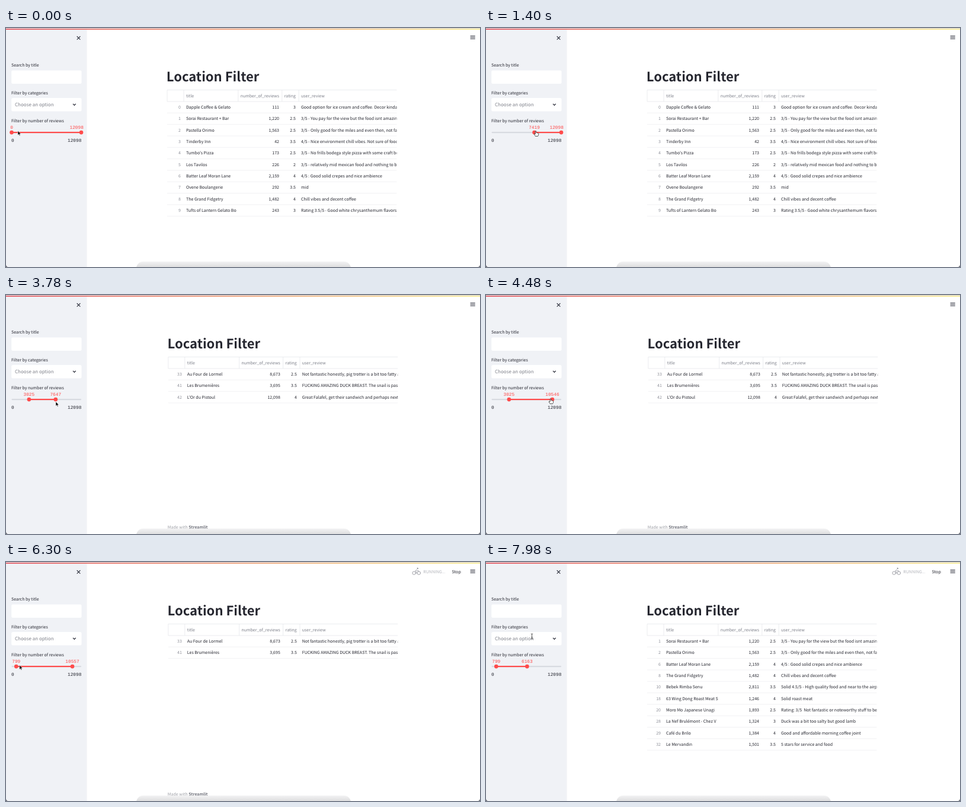
Write an HTML page that moves like this. It is 800 px wide and 403 px high and loops after 8000 ms.

```html
<!DOCTYPE html>
<html lang="en">
<head>
<meta charset="utf-8">
<title>Location Filter</title>
<style>
html, body { margin: 0; width: 100%; height: 100%; overflow: hidden; background: #fff; }
svg { display: block; width: 100vw; height: 100vh; }
text {
  font: 7.03px "Noto Sans CJK SC", "Noto Sans CJK JP", "Noto Sans CJK TC", "Noto Sans CJK KR", Lato, sans-serif;
  fill: #262730; white-space: pre; text-rendering: geometricPrecision;
}
.title { font-size: 22px; font-weight: 700; }
.hint { font-size: 8.02px; fill: #7f818a; }
.head { fill: #7c7f89; }
.index { fill: #8e9099; }
.foot { fill: #9b9da4; }
.num { font: 7.8px "Liberation Mono", monospace; }
.red { fill: #ff4b4b; }
.pale { fill: #b4b6bc; }
</style>
</head>
<body>
<svg id="stage" viewBox="0 0 800 403" preserveAspectRatio="none">
  <defs>
    <linearGradient id="bar"><stop offset="0" stop-color="#e5606b"/><stop offset=".5" stop-color="#efa680"/><stop offset="1" stop-color="#f8ee9c"/></linearGradient>
    <linearGradient id="dockFill" x2="0" y2="1"><stop offset="0" stop-color="#f3f3f4"/><stop offset="1" stop-color="#dededf"/></linearGradient>
    <clipPath id="nameClip"><rect x="300" y="100" width="91.7" height="230"/></clipPath>
    <clipPath id="tableClip"><rect x="270" y="100" width="389.5" height="230"/></clipPath>
  </defs>
  <rect width="800" height="403" fill="#fff"/>
  <g id="sidebar"><rect width="136.5" height="403" fill="#f0f2f6"/></g>
  <rect width="800" height="1" fill="#dcd8da"/>
  <rect y="1.2" width="800" height="1.8" fill="url(#bar)"/>
  <g id="page"></g>
  <g fill="none" stroke="#31333f">
    <path d="M119.7 14l5.7 5.7m0-5.7l-5.7 5.7" stroke-width="1.1"/>
    <path d="M783.6 13.4h8.2m-8.2 2.4h8.2m-8.2 2.4h8.2" stroke-width="1"/>
  </g>
  <g id="status">
    <g id="person" fill="none" stroke="#b3b5bb" stroke-width="1.5" stroke-linecap="round">
      <circle cx="692.5" cy="11.6" r=".9" fill="#b3b5bb" stroke-width=".6"/>
      <path d="M688.5 14.2l4 .5l4-.5M692.5 15v2.5l-1.5 4m1.5-4l1.5 4"/>
    </g>
    <g id="cyclist" fill="none" stroke="#93959c" stroke-width=".9" stroke-linecap="round" stroke-linejoin="round">
      <circle cx="688.7" cy="18.6" r="2.7"/><circle cx="696.9" cy="18.6" r="2.7"/>
      <circle cx="694.6" cy="10.8" r=".8" fill="#93959c"/>
      <path d="M696.7 15h-2.2l-1.7-1.9l-2.2 2l2.2 1.6v2.6"/>
    </g>
  </g>
  <path d="M220 403q3-9.3 12-9.3h338q9 0 12 9.3z" fill="url(#dockFill)"/>
  <path d="M0 399.5q.4 3 3 3.5H0zM800 399.5q-.4 3-3 3.5h3z" fill="#55565e"/>
  <g id="cursor" stroke-linejoin="round">
    <path id="arrow" d="M0 0V7.2L1.7 5.6L2.8 8.3L4 7.8L2.9 5.2H5.2Z" fill="#000" stroke="#fff" stroke-width=".5"/>
    <path id="hand" d="M-.8 .6Q0-.5.8.6V3.1Q1.7 2.6 2.3 3.4Q3.2 3 3.7 3.9Q4.8 3.8 4.8 5Q4.8 7.4 3.5 9H-.7Q-1.4 7.3-3 5.5Q-2.6 4.4-.8 5.6Z" fill="#fff" stroke="#222" stroke-width=".75"/>
    <path id="beam" d="M-1.6-4.3Q0-4.3 0-3.2Q0-4.3 1.6-4.3M0-3.2V3.7M-1.6 4.6Q0 4.6 0 3.5Q0 4.6 1.6 4.6M-1 1.6H1" fill="none" stroke="#333" stroke-width=".8"/>
  </g>
</svg>
<script>
const LOOP = 8000, STEP = 70, MAX = 12098;
const $ = id => document.getElementById(id);

function add(parent, tag, attrs, content) {
  const el = document.createElementNS('http://www.w3.org/2000/svg', tag);
  for (const k in attrs) el.setAttribute(k, attrs[k]);
  if (content !== undefined) el.textContent = content;
  parent.appendChild(el);
  return el;
}
const label = (parent, x, y, str, cls = '', anchor = 'start') =>
  add(parent, 'text', { x, y, class: cls, 'text-anchor': anchor }, str);

// Sidebar
const side = $('sidebar');
label(side, 9, 65.4, 'Search by title');
label(side, 9, 112, 'Filter by categories');
label(side, 9, 158.6, 'Filter by number of reviews');
for (const y of [71.5, 118]) add(side, 'rect', { x: 9.2, y, width: 118.3, height: 22.6, rx: 2.5, fill: '#fff' });
label(side, 15, 132.2, 'Choose an option', 'hint');
add(side, 'path', { d: 'M113 127.9l2.4 2.4l2.4-2.4', fill: 'none', stroke: '#31333f', 'stroke-width': 1.3 });
add(side, 'rect', { x: 9.5, y: 175, width: 117.5, height: 2.2, rx: 1, fill: '#d8dae0' });
const range = add(side, 'rect', { y: 175, height: 2.2, fill: '#ff4b4b' });
label(side, 9, 191.5, '0', 'num');
label(side, 127.4, 191.5, MAX, 'num', 'end');
const thumbs = [0, 1].map(() => ({
  dot: add(side, 'circle', { cy: 176.1, r: 3.35, fill: '#ff4b4b' }),
  text: label(side, 0, 169.8, '', 'num red', 'middle')
}));

// Main page
const opening = `0|Dapple Coffee & Gelato|111|3|Good option for ice cream and coffee. Decor kinda
1|Sorai Restaurant + Bar|1,220|2.5|3/5 - You pay for the view but the food isnt amazing
2|Pastella Orimo|1,563|2.5|3/5 - Only good for the miles and even then, not fan
3|Tinderby Inn|42|3.5|4/5 - Nice environment chill vibes. Not sure of food
4|Tumbo's Pizza|173|2.5|3/5 - No frills bodega style pizza with some craft beer
5|Los Tavilos|226|2|3/5 - relatively mid mexican food and nothing to be
6|Batter Leaf Moran Lane|2,159|4|4/5 : Good solid crepes and nice ambience
7|Ovene Boulangerie|292|3.5|mid
8|The Grand Fidgetry|1,482|4|Chill vibes and decent coffee
9|Tufts of Lantern Gelato Bo|243|3|Rating 3.5/5 - Good white chrysanthemum flavors`.split('\n');
const large = `33|Au Four de Lormel|8,673|2.5|Not fantastic honestly, pig trotter is a bit too fatty a
41|Les Brumenières|3,695|3.5|FUCKING AMAZING DUCK BREAST. The snail is pas
42|L'Or du Pistoul|12,098|4|Great Falafel, get their sandwich and perhaps next`.split('\n');
const middle = [opening[1], opening[2], opening[6], opening[8], ...`10|Bebek Rimba Senu|2,811|3.5|Solid 4.5/5 - High quality food and near to the airport
18|63 Wing Dong Roast Meat S|1,246|4|Solid roast meat
20|Moro Mo Japanese Unagi|1,893|2.5|Rating: 3/5  Not fantastic or noteworthy stuff to be
28|La Nef Brulémont - Chez V|1,324|3|Duck was a bit too salty but good lamb
29|Café du Brilo|1,384|4|Good and affordable morning coffee joint
32|Le Mervandin|1,501|3.5|5 stars for service and food`.split('\n')];

function buildView(rows, short) {
  const view = add($('page'), 'g', { transform: `translate(${short ? 1.8 : 0} 0)` });
  label(view, 270.8, 89.5, 'Location Filter', 'title');
  const table = add(view, 'g', { 'clip-path': 'url(#tableClip)' });
  add(table, 'path', {
    d: 'M272 104.5H660M272 124H660M272 104.5V124M300 104.5V124M391.8 104.5V124M465.8 104.5V124M494.2 104.5V124',
    fill: 'none', stroke: '#e6e7eb', 'stroke-width': .8
  });
  label(table, 304, 116.8, 'title', 'head');
  label(table, 461, 116.8, 'number_of_reviews', 'head', 'end');
  label(table, 489, 116.8, 'rating', 'head', 'end');
  label(table, 498, 116.8, 'user_review', 'head');
  const names = add(table, 'g', { 'clip-path': 'url(#nameClip)' });
  rows.forEach((row, i) => {
    const [index, name, count, rating, review] = row.split('|');
    const y = 136.1 + i * 19.33;
    label(table, 295, y, index, 'index', 'end');
    label(names, 304, y, name);
    label(table, 461, y, count, '', 'end');
    label(table, 489, y, rating, '', 'end');
    label(table, 498, y, review);
    add(table, 'path', { d: `M272 ${y + 7.2}H660`, stroke: '#ececef', 'stroke-width': .7 });
  });
  if (short) {
    const foot = label(view, 271, 394.2, 'Made with ', 'foot');
    add(foot, 'tspan', { fill: '#6f717a', 'font-weight': 600 }, 'Streamlit');
  }
  return view;
}
const views = [
  { from: 0, el: buildView(opening, false) },
  { from: 3000, el: buildView(large, true) },
  { from: 4970, el: buildView(large.slice(0, 2), true) },
  { from: 6860, el: buildView(middle, false) }
];

label($('status'), 704.3, 18.6, 'RUNNING...', 'pale');
label($('status'), 752.6, 18.6, 'Stop');

// Timeline: [time, value...]
const lowKeys = [[350, 0], [1200, 7419], [1470, 7419], [2030, 3025], [5600, 3025], [5950, 799]];
const highKeys = [[3150, MAX], [3640, 7647], [3950, 7647], [4500, 10557], [7210, 10557], [7500, 6163]];
const cursorKeys = [
  [0, 20, 173.5], [280, 10, 174], [350, 10, 174], [1200, 84, 173.5], [1470, 84, 173.5], [2030, 40, 174],
  [2170, 40, 174], [2520, 112, 179.5], [2870, 127, 175], [3150, 127, 175], [3640, 84, 180], [3950, 84, 180],
  [4500, 109, 174.5], [5180, 109, 174.5], [5460, 39, 174], [5600, 39, 174], [5950, 17, 174], [6200, 17, 174],
  [6930, 130, 175], [7000, 130, 175], [7140, 113, 174], [7210, 113, 174], [7500, 70, 174], [7630, 70, 174], [7910, 77.5, 125.3]
];
const shapes = [[0, 'arrow'], [280, 'hand'], [2240, 'arrow'], [2870, 'hand'], [3500, 'arrow'], [4200, 'hand'],
  [5250, 'arrow'], [5460, 'hand'], [6270, 'arrow'], [7140, 'hand'], [7700, 'arrow'], [7840, 'beam']];
const runs = [[1610, 1960, 'person'], [2450, 3000, 'person'], [4100, 4400, 'cyclist'],
  [4690, 4970, 'cyclist'], [6130, 6860, 'cyclist'], [7700, LOOP, 'cyclist']];

function sample(keys, t, col = 1) {
  const i = keys.findIndex(k => k[0] > t);
  if (i === 0) return keys[0][col];
  if (i < 0) return keys[keys.length - 1][col];
  const a = keys[i - 1], b = keys[i];
  const u = (t - a[0]) / (b[0] - a[0]);
  return a[col] + (b[col] - a[col]) * u * u * (3 - 2 * u);
}
const show = (el, on) => el.setAttribute('visibility', on ? 'visible' : 'hidden');
const lastBefore = (list, start, t) => list.filter(item => start(item) <= t).pop();

function draw(t) {
  const values = [lowKeys, highKeys].map(keys => Math.round(sample(keys, t)));
  const xs = values.map(v => 9.5 + v / MAX * 117.5);
  thumbs.forEach(({ dot, text }, i) => {
    dot.setAttribute('cx', xs[i]);
    text.setAttribute('x', Math.max(8.3, Math.min(xs[i], 119.2)));
    text.textContent = values[i];
  });
  range.setAttribute('x', xs[0]);
  range.setAttribute('width', Math.max(0, xs[1] - xs[0]));

  const view = lastBefore(views, v => v.from, t);
  views.forEach(v => v.el.setAttribute('display', v === view ? 'inline' : 'none'));

  const run = runs.find(r => t >= r[0] && t < r[1]);
  $('status').setAttribute('opacity', run ? Math.min(1, (t - run[0]) / 150) : 0);
  for (const id of ['person', 'cyclist']) show($(id), run && run[2] === id);

  const shape = lastBefore(shapes, s => s[0], t)[1];
  for (const id of ['arrow', 'hand', 'beam']) show($(id), id === shape);
  $('cursor').setAttribute('transform', `translate(${sample(cursorKeys, t)} ${sample(cursorKeys, t, 2)})`);
}

const start = performance.now();
function tick(now) {
  const t = Math.max(0, now - start) % LOOP;
  draw(Math.floor(t / STEP) * STEP);
  requestAnimationFrame(tick);
}
draw(0);
requestAnimationFrame(tick);
</script>
</body>
</html>
```
